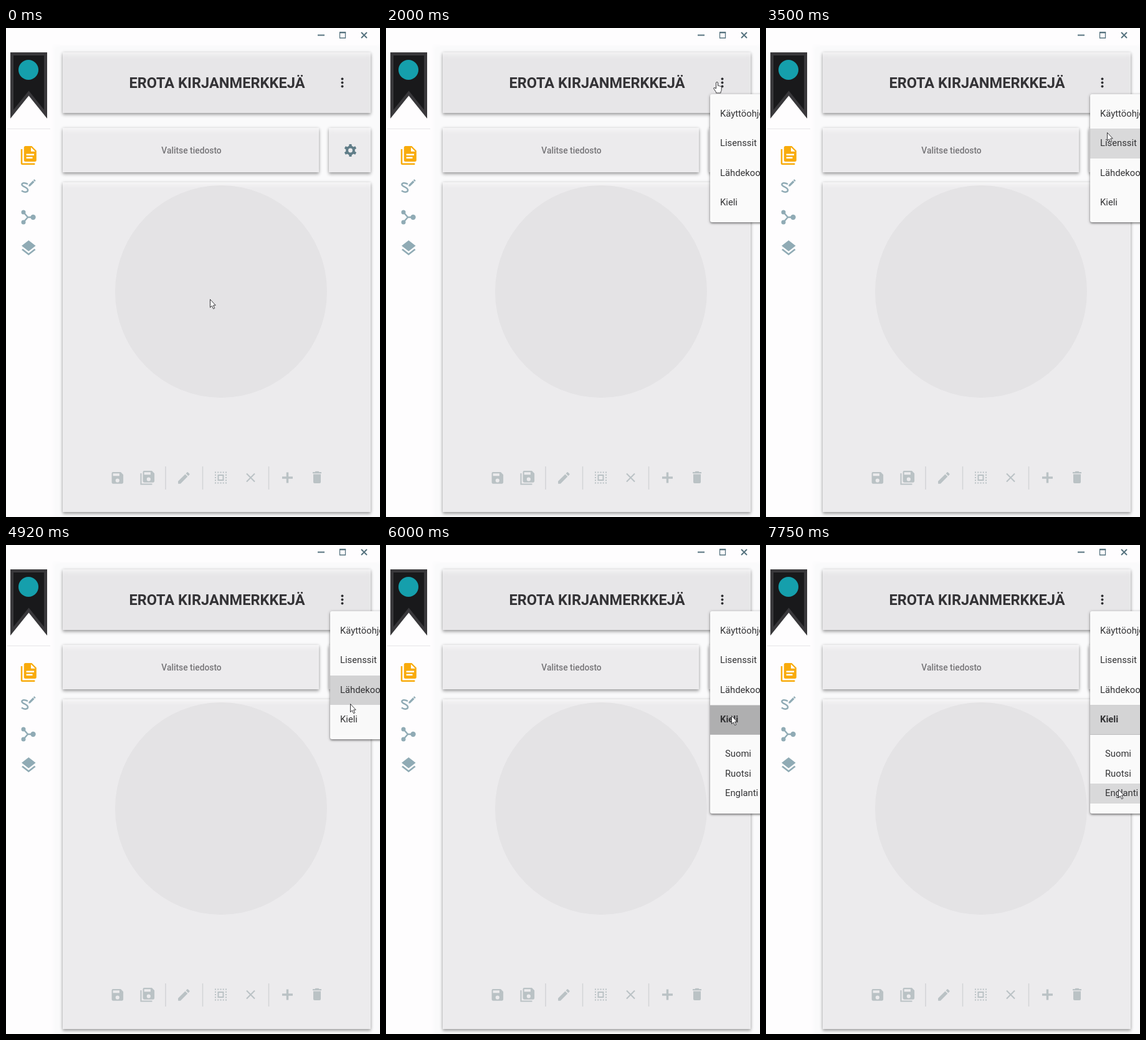
An HTML page that plays this animation: 600 by 783 pixels, repeating every 8 s.

```html
<!DOCTYPE html>
<html lang="fi">
<head>
<meta charset="utf-8">
<title>Erota kirjanmerkkejä</title>
<style>
  html, body { margin: 0; width: 100%; height: 100%; overflow: hidden; background: #fefdfe; }
  body { position: relative; font-family: Roboto, sans-serif; }
  .content { position: absolute; left: 80px; top: 32px; right: 0; bottom: 0; background: #fafafb; box-shadow: 0 0 6px 4px #fafafb; }
  .panel {
    position: absolute; box-sizing: border-box; background: #ecebed;
    box-shadow: 0 3px 5px rgba(0,0,0,.32), 0 0 5px rgba(0,0,0,.13), inset 0 7px 8px -4px rgba(255,255,255,.65);
  }
  .header { left: 91px; top: 39px; width: 494px; height: 97px; background: #e7e6e8; }
  .file { left: 91px; top: 160px; width: 411px; height: 71px; }
  .settings { left: 518px; top: 160px; width: 67px; height: 71px; }
  .main { left: 91px; top: 247px; width: 494px; height: 528px; }
  svg { position: absolute; left: 0; top: 0; overflow: hidden; }

  .menu {
    position: absolute; left: 520px; top: 106px; width: 190px; height: 205px; overflow: hidden;
    background: #fafafa; border-radius: 3px; color: #333335; font-size: 14.8px; white-space: nowrap;
    box-shadow: 0 1px 5px rgba(0,0,0,.32), 0 2px 3px rgba(0,0,0,.28);
  }
  .item, .lang { position: absolute; left: 0; width: 100%; box-sizing: border-box; }
  .item { top: calc(8px + 47.4px * var(--i)); height: 47.4px; line-height: 46.4px; padding-left: 16px; }
  .lang { top: calc(213px + 31.6px * var(--i)); height: 31.6px; line-height: 31px; padding-left: 24px; }

  .menu, .item, .lang, .pointer, .arrow, .hand { animation: 8s linear -4ms infinite; }
  .menu { animation-name: open, expand; }
  .guide { animation-name: guide; }
  .licenses { animation-name: licenses; }
  .source { animation-name: code; }
  .language { animation-name: language, selected; animation-timing-function: linear, step-end; }
  .fi { animation-name: fi; }
  .sv { animation-name: sv; }
  .en { animation-name: en; }
  .pointer { animation-name: move; }
  .arrow { animation-name: arrow; animation-timing-function: step-end; }
  .hand { animation-name: hand; animation-timing-function: step-end; }

  @keyframes open {
    0%, 18.75% { opacity: 0; animation-timing-function: steps(3); }
    21.875%, 100% { opacity: 1; }
  }
  @keyframes expand {
    0%, 68.75% { height: 205px; animation-timing-function: steps(4); }
    72.917%, 100% { height: 324px; }
  }
  @keyframes guide {
    0%, 28.125% { background: #d9d9da00; }
    31.25%, 39.58% { background: #d9d9da; }
    42.7%, 100% { background: #d9d9da00; }
  }
  @keyframes licenses {
    0%, 40.625% { background: #d9d9da00; }
    43.75%, 52.08% { background: #d9d9da; }
    55.21%, 100% { background: #d9d9da00; }
  }
  @keyframes code {
    0%, 52.08% { background: #d1d1d200; }
    55.21%, 61.46% { background: #d1d1d2; }
    64.58%, 100% { background: #d1d1d200; }
  }
  @keyframes language {
    0%, 61.46% { background: #d4d4d500; }
    64.58%, 68.75% { background: #d4d4d5; }
    71.875%, 75% { background: #afafb0; }
    80.21%, 100% { background: #d4d4d5; }
  }
  @keyframes selected {
    0% { font-weight: 400; box-shadow: none; }
    69.79%, 100% { font-weight: 700; box-shadow: inset 0 -1px #bdbdbe, inset 0 1px #d0d0d1; }
  }
  @keyframes fi {
    0%, 78.125% { background: #d9d9da00; }
    80.21%, 83.33% { background: #d9d9da; }
    86.46%, 100% { background: #d9d9da00; }
  }
  @keyframes sv {
    0%, 83.33% { background: #d9d9da00; }
    86.46%, 90.6% { background: #d9d9da; }
    93.75%, 100% { background: #d9d9da00; }
  }
  @keyframes en {
    0%, 90.6% { background: #d9d9da00; }
    93.75%, 100% { background: #d9d9da; }
  }
  @keyframes move {
    0%, 3.125% { transform: translate(327px, 434px); animation-timing-function: steps(3); }
    6.25% { transform: translate(375px, 345px); animation-timing-function: steps(4); }
    10.417% { transform: translate(495px, 140px); animation-timing-function: steps(3); }
    13.542% { transform: translate(528px, 92px); animation-timing-function: steps(2); }
    15.625%, 26.042% { transform: translate(531px, 86px); animation-timing-function: steps(8); }
    34.375%, 38.542% { transform: translate(546px, 136px); animation-timing-function: steps(5); }
    43.75% { transform: translate(547px, 167px); animation-timing-function: steps(2); }
    45.833%, 51.042% { transform: translate(547px, 169px); animation-timing-function: steps(4); }
    55.208%, 56.25% { transform: translate(550px, 230px); animation-timing-function: steps(5); }
    61.458% { transform: translate(552px, 254px); animation-timing-function: steps(3); }
    64.583%, 75% { transform: translate(554px, 273px); animation-timing-function: steps(5); }
    80.208%, 82.292% { transform: translate(558px, 332px); animation-timing-function: steps(4); }
    86.458% { transform: translate(562px, 355px); animation-timing-function: steps(1); }
    87.5%, 88.542% { transform: translate(562px, 357px); animation-timing-function: steps(8); }
    96.875%, 100% { transform: translate(565px, 391px); }
  }
  @keyframes arrow {
    0% { visibility: visible; }
    13.54% { visibility: hidden; }
    29.16%, 100% { visibility: visible; }
  }
  @keyframes hand {
    0% { visibility: hidden; }
    13.54% { visibility: visible; }
    29.16%, 100% { visibility: hidden; }
  }
</style>
</head>
<body>
<div class="content"></div>
<div class="panel header"></div>
<div class="panel file"></div>
<div class="panel settings"></div>
<div class="panel main"></div>

<svg width="600" height="783" viewBox="0 0 600 783">
  <defs>
    <path id="disk" fill-rule="evenodd" d="M17 3H5a2 2 0 0 0-2 2v14a2 2 0 0 0 2 2h14a2 2 0 0 0 2-2V7zM12 19a3 3 0 1 1 0-6 3 3 0 0 1 0 6zM15 9H5V5h10z"/>
    <path id="pencil" d="M3 17.25V21h3.75L17.8 9.94l-3.75-3.75zM20.7 7.04a1 1 0 0 0 0-1.41l-2.34-2.34a1 1 0 0 0-1.41 0l-1.83 1.83 3.75 3.75z"/>
    <path id="tooth" d="M-2.4-6.5-1.9-10H1.9L2.4-6.5z"/>
  </defs>

  <circle cx="345" cy="422" r="170" fill="#e4e3e5"/>

  <g fill="none" stroke="#56737f" stroke-width="2">
    <path d="M500 11.5h11M570 7l9 9m0-9-9 9"/>
    <path d="M535.5 7v9h9V7" stroke-width="1.3"/>
    <path d="M535 7.2h10.2" stroke-width="2.4"/>
  </g>

  <path d="M9.5 41.5h54V138L36.5 104.5 9.5 138z" fill="#19191b" stroke="#39383b" stroke-width="5"/>
  <circle cx="36" cy="67" r="16" fill="#159fac"/>
  <path d="M2 161.5h69" stroke="#e6e5e7"/>

  <path transform="translate(21.3 189) scale(1.25)" fill="#f8ab0c" d="M15 7h5.5L15 1.5zM8 0h8l6 6v12a2 2 0 0 1-2 2H8a2 2 0 0 1-2-2V2a2 2 0 0 1 2-2m9 16v-2H9v2zm2-4v-2H9v2zM4 4v18h16v2H4a2 2 0 0 1-2-2V4z"/>
  <g fill="#90abb5">
    <path d="M35 250c-5-3-10-2-9.500 1s9 4 9.500 8-5 5-10 1.500" fill="none" stroke="#90abb5" stroke-width="2.5"/>
    <use href="#pencil" transform="translate(34.500 240.500) scale(.62)"/>
    <path d="M28 295 35 303 28 311M35 303h8" fill="none" stroke="#90abb5" stroke-width="2.4"/>
    <circle cx="28" cy="295" r="3.5"/><circle cx="28" cy="311" r="3.5"/><circle cx="43.500" cy="303" r="4.2"/>
    <path transform="translate(21.300 337.500) scale(1.25)" d="M12 16l9-7-9-7-9 7zM12 18.500l-7.400-5.700L3 14.100l9 7 9-7-1.600-1.300z"/>
  </g>

  <text x="338.500" y="96" text-anchor="middle" font-size="23.6" font-weight="700" fill="#343336">EROTA KIRJANMERKKEJÄ</text>
  <text x="297.500" y="200.500" text-anchor="middle" font-size="13.84" font-weight="500" fill="#767578">Valitse tiedosto</text>
  <g fill="#303033"><circle cx="539.500" cy="81.500" r="2"/><circle cx="539.500" cy="87.500" r="2"/><circle cx="539.500" cy="93.500" r="2"/></g>

  <g transform="translate(552.500 196)" fill="#607d88">
    <circle r="5.400" fill="none" stroke="#607d88" stroke-width="4"/>
    <use href="#tooth"/><use href="#tooth" transform="rotate(60)"/><use href="#tooth" transform="rotate(120)"/>
    <use href="#tooth" transform="rotate(180)"/><use href="#tooth" transform="rotate(240)"/><use href="#tooth" transform="rotate(300)"/>
  </g>

  <path d="M256 702v37M315.500 702v37M421.500 702v37" stroke="#d2d4d6" stroke-width="1.500"/>
  <g fill="#bac2c5">
    <use href="#disk" transform="translate(166.500 708) scale(1.030)"/>
    <use href="#disk" transform="translate(216.500 706) scale(1.030)"/>
    <path d="M216.500 713v17.500h18" fill="none" stroke="#bac2c5" stroke-width="2"/>
    <use href="#pencil" transform="translate(273 708) scale(1.030)"/>
    <g fill="none" stroke="#bac2c5" stroke-width="2">
      <rect x="336" y="711.500" width="17" height="17" stroke-dasharray="2 2.250" stroke-dashoffset="1"/>
      <rect x="340.500" y="716" width="8" height="8"/>
      <path d="M386 713.500l13 13m0-13-13 13"/>
      <path d="M451.500 711.500v17m-8.500-8.500h17" stroke-width="3.500"/>
    </g>
    <path d="M493 714.500h12V727a2 2 0 0 1-2 2h-8a2 2 0 0 1-2-2zM492 711h3.500l1-1.200h5l1 1.200h3.500v2.200h-14z"/>
  </g>
</svg>

<div class="menu">
  <div class="item guide" style="--i:0">Käyttöohjeet</div>
  <div class="item licenses" style="--i:1">Lisenssit</div>
  <div class="item source" style="--i:2">Lähdekoodi</div>
  <div class="item language" style="--i:3">Kieli</div>
  <div class="lang fi" style="--i:0">Suomi</div>
  <div class="lang sv" style="--i:1">Ruotsi</div>
  <div class="lang en" style="--i:2">Englanti</div>
</div>

<svg width="600" height="783" viewBox="0 0 600 783">
  <g class="pointer" fill="#fff" stroke="#38383b" stroke-linejoin="round">
    <path class="arrow" d="M.5.5V13.500l2.900-2.700 2.200 4.900 2.200-1-2.200-4.700h3.700z"/>
    <path class="hand" d="M-1.500 11V2a1.500 1.500 0 0 1 3 0V6.500q1.500-.8 2.200.5 1.300-.6 2 .5 1.500-.3 1.500 1.300V13q0 2-1.200 3v2H-1.500v-1.500L-5 11.500q-.8-2 1-2z"/>
  </g>
</svg>
</body>
</html>
```
